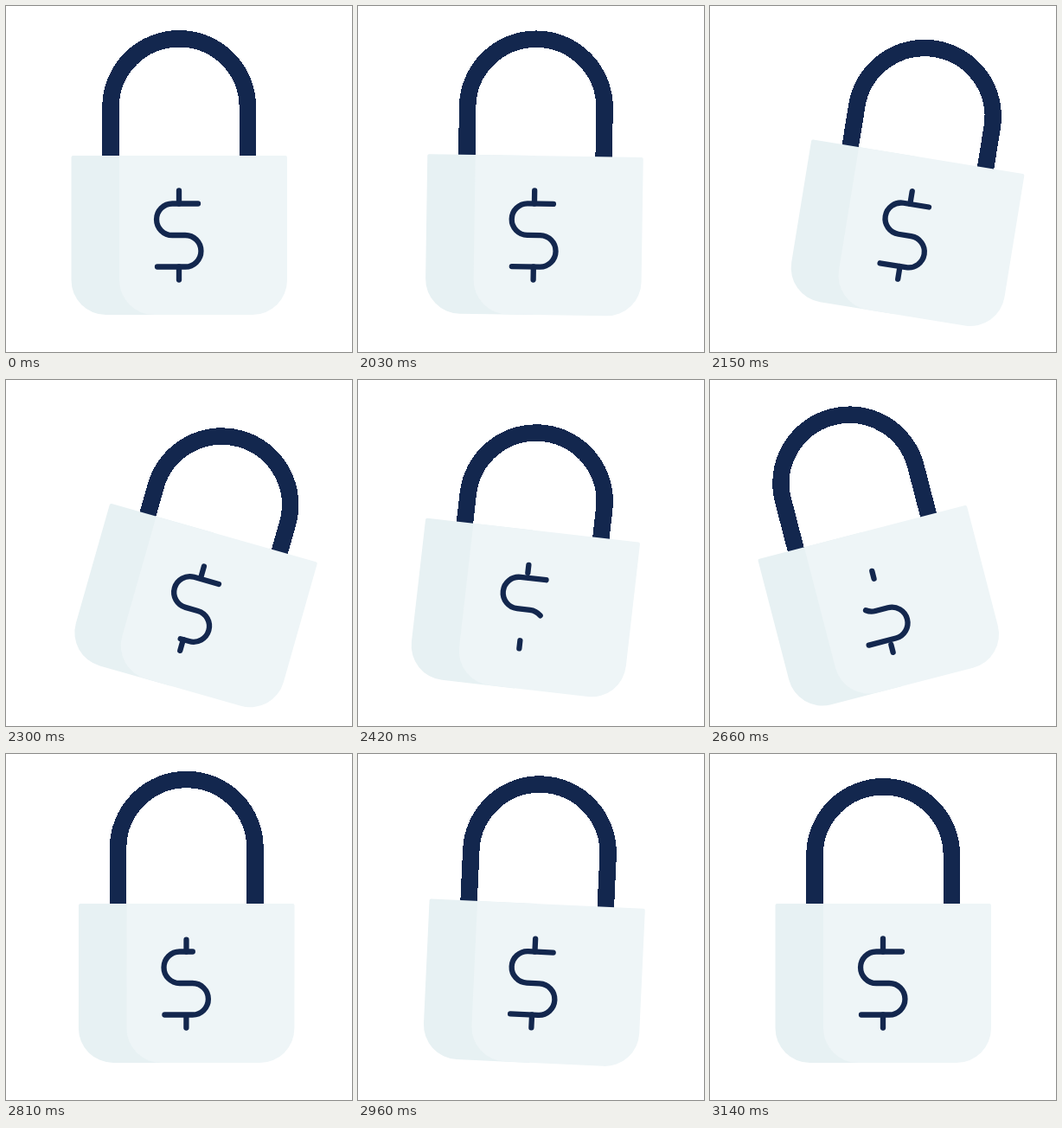
An HTML page for the animation above (3.17 s loop, 400 by 400 pixels).

```html
<!DOCTYPE html>
<html lang="en">
<head>
<meta charset="utf-8">
<title>Padlock</title>
<style>
  html, body { margin: 0; width: 100%; height: 100%; overflow: hidden; background: #fff; }
  svg { display: block; width: 100%; height: 100%; }
  path { fill: none; stroke: #13274e; }
  .body { stroke: none; }
  .sign { stroke-width: 6.3; stroke-linecap: round; stroke-linejoin: round; }
</style>
</head>
<body>
<svg viewBox="0 0 400 400">
  <g id="lock">
    <path id="shackle" stroke-width="19.5" shape-rendering="crispEdges"
      d="M121 210V117a79.2 79.2 0 0 1 158.4 0V210"/>
    <path class="body" style="fill:#e7f1f3" d="M77.5 173H200V357H115.5a40 40 0 0 1-40-40V175a2 2 0 0 1 2-2z"/>
    <path class="body" style="fill:#eef5f7" d="M131 173H323a2 2 0 0 1 2 2V317a40 40 0 0 1-40 40H171a40 40 0 0 1-40-40z"/>
    <path class="sign" pathLength="1" d="M200 213.5V228.5"/>
    <path class="sign" pathLength="1" d="M200 301.5V316.5"/>
    <path class="sign" pathLength="1"
      d="M222 228.5H192.3a18.25 18.25 0 0 0 0 36.5H207.2a18.25 18.25 0 0 1 0 36.5H175"/>
  </g>
</svg>
<script>
  const LOOP = 3170, REST = 2030, STEP = 30, END = 36;
  const lock = document.getElementById('lock');
  const shackle = document.getElementById('shackle');
  const strokes = document.querySelectorAll('.sign');

  // Swings between [step, value] turning points with a sine ease
  const swing = (...turns) => k => {
    const i = turns.findIndex(([step]) => step > k);
    if (i < 1) return 0;
    const [k0, a] = turns[i - 1], [k1, b] = turns[i];
    return a + (b - a) * (1 - Math.cos(Math.PI * (k - k0) / (k1 - k0))) / 2;
  };

  // The shift leads, the tilt follows, the shackle lags behind both
  const shift = swing([-0.5, 0], [6, 27], [17.5, -18], [25.3, 9], [END, 0]);
  const tilt = swing([-0.5, 0], [9.5, 16], [21.5, -14.7], [29.4, 4], [END, 0]);
  const drop = swing([0, 0], [12, 24], [26, -8.5], [END, 0]);

  // Each stroke is wiped from its end, then drawn back from its end
  function trim(k) {
    const half = END / 2;
    const gone = Math.max(0, 1 - Math.abs(k - half) / half) ** 3.7;
    for (const { style } of strokes) {
      style.visibility = gone > 0.999 ? 'hidden' : 'visible';
      style.strokeDasharray = gone < 0.001 ? 'none' : `${1 - gone} 2`;
      style.strokeDashoffset = k > half ? -gone : 0;
    }
  }

  function draw(t) {
    const k = t < REST ? -1 : 1 + Math.floor((t - REST) / STEP);
    lock.setAttribute('transform', `translate(${shift(k)} 0) rotate(${tilt(k)} 200 265)`);
    shackle.setAttribute('transform', `translate(0 ${drop(k)})`);
    trim(k);
  }

  const start = performance.now();
  function loop() {
    draw((performance.now() - start) % LOOP);
    requestAnimationFrame(loop);
  }
  loop();
</script>
</body>
</html>
```
